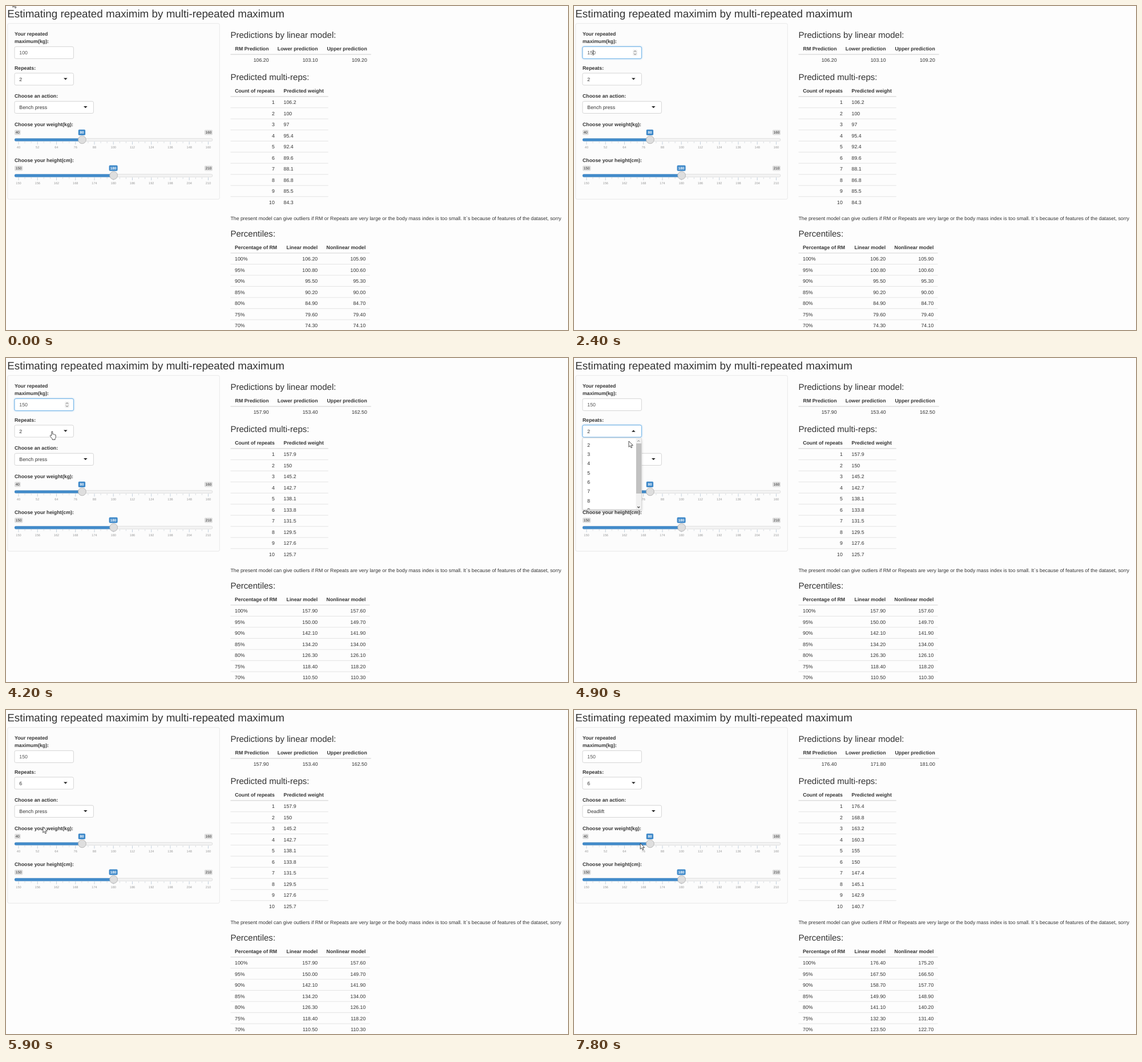
These frames come from a looping animation (985x569 px, 8 s). An HTML page:

```html
<!DOCTYPE html>
<html lang="en">
<head>
<meta charset="utf-8">
<title>Repeated maximum</title>
<style>
html, body { margin: 0; width: 100%; height: 100%; overflow: hidden; background: #fdfdfd; }
svg { display: block; }
text {
  font-family: "Liberation Sans", Arial, sans-serif;
  font-size: 8.79px;
  fill: #333;
  text-rendering: geometricPrecision;
}
.h2 { font-size: 18.84px; }
.h3 { font-size: 15.07px; }
.b { font-weight: bold; }
.e { text-anchor: end; }
.m { text-anchor: middle; }
.tag { font-size: 6.28px; }
.on { fill: #fff; }
.tick { font-size: 5.65px; fill: #999; }
.box { fill: #fff; stroke: #ccc; stroke-width: .8; }
.focus { fill: #fff; stroke: #66afe9; stroke-width: .9; }
.glow { fill: #66afe9; opacity: .6; filter: url(#soft); }
.shade { fill: #000; opacity: .2; filter: url(#wide); }
.rule { stroke: #ddd; stroke-width: .8; }
.head { stroke-width: 1.26; }
.pointer { fill: #fff; stroke: #222; stroke-width: .8; stroke-linejoin: round; }
</style>
</head>
<body>
<svg id="stage" width="985" height="569" viewBox="0 0 985 569">
  <defs>
    <filter id="soft" x="-20%" y="-50%" width="140%" height="200%"><feGaussianBlur stdDeviation="1.5"/></filter>
    <filter id="wide" x="-20%" y="-30%" width="140%" height="160%"><feGaussianBlur stdDeviation="2.2"/></filter>
    <clipPath id="listClip"><rect x="15" y="140" width="103.5" height="126"/></clipPath>
  </defs>
  <g id="page"></g>
  <g id="tables"></g>
  <g id="lists"></g>
  <g id="cursors">
    <path id="arrow" class="pointer" d="M0 0V10.3L2.4 8L4 11.8L5.8 11L4.2 7.4H7.4Z"/>
    <path id="hand" class="pointer" d="M3 8V1.6Q3 .4 4 .4T5 1.6V5.4Q6 4.7 6.8 5.7Q7.8 5.2 8.6 6.3Q10.4 5.9 10.4 7.6V10.4Q10.4 12.3 9.2 13.2V15H4.4V13.6L.8 9.2Q-.2 7.6 1.2 7.2Q2.2 7 3 8Z"/>
    <path id="beam" d="M-1.6 -5H1.6M0 -5V5M-1.6 5H1.6" stroke="#fff" stroke-width="1.1"/>
  </g>
</svg>
<script>
const $ = id => document.getElementById(id);
const text = (x, y, s, cls = '', id = '') => `<text x="${x}" y="${y}" class="${cls}" id="${id}">${s}</text>`;
const rect = (x, y, w, h, cls, more = '') => `<rect x="${x}" y="${y}" width="${w}" height="${h}" class="${cls}" ${more}/>`;
const rule = (x, y, end, cls = '') => `<path class="rule ${cls}" d="M${x} ${y}H${end}"/>`;
const group = (id, body) => `<g id="${id}">${body}</g>`;

// Text field with a focus ring that can be faded in.
const field = (id, y, w) => rect(15, y, w, 21.1, 'box', 'rx="2.5"') +
  group(id + 'Ring', rect(14.5, y - .5, w + 1, 22.1, 'glow', 'rx="3"') + rect(15, y, w, 21.1, 'focus', 'rx="2.5"'));

const select = (id, y, w, value) => field(id, y, w) +
  text(23.3, y + 13.7, value, '', id + 'Text') +
  `<path id="${id}Down" fill="#222" d="M${w - 2.4} ${y + 8.6}h6.6l-3.3 3.3z"/>` +
  `<path id="${id}Up" fill="#222" d="M${w - 2.4} ${y + 11.9}h6.6l-3.3 -3.3z"/>`;

function slider(y, min, step, value, knob, minW, tagW) {
  const fill = (x, w, c) => rect(x, y - 17.4, w, 9, '', `rx="1.8" fill="${c}"`);
  let s = rect(15.3, y - 2.4, 346.6, 4.8, '', 'rx="2.4" fill="#f3f3f3" stroke="#d6d6d6" stroke-width=".7"') +
    rect(15, y - 2.6, knob - 15, 5.2, '', 'rx="2" fill="#428bca"');
  for (let i = 0; i <= 30; i++) {
    const big = i % 3 === 0, x = 22 + i * 11.083;
    s += `<path d="M${x} ${y + 3.3}v${big ? 5 : 2.5}" stroke="${big ? '#a9bccd' : '#c4ccd4'}" stroke-width=".7"/>`;
    if (big) s += text(x, y + 14.9, min + step * i / 3, 'tick m');
  }
  return s + fill(15, minW, '#ddd') + text(15 + minW / 2, y - 10.6, min, 'tag m') +
    fill(347.8, 14.2, '#ddd') + text(354.9, y - 10.6, min + step * 10, 'tag m') +
    rect(knob - .5 - tagW / 2, y - 18, tagW, 10, '', 'rx="1.8" fill="#428bca"') +
    text(knob - .5, y - 10.6, value, 'tag m on b') +
    `<circle cx="${knob}" cy="${y - .2}" r="6.9" fill="#dedede" stroke="#ababab" stroke-width=".8"/>`;
}

const dropdown = (y, w, h, items) =>
  rect(15, y + 3, w, h, 'shade') + rect(15, y, w, h, 'box', 'rx="1.5"') +
  items.map((s, i) => text(23.3, y + 15.4 + i * 16.33, s)).join('');

$('page').innerHTML =
  text(2.3, 20.3, 'Estimating repeated maximim by multi-repeated maximum', 'h2') +
  rect(2.8, 30.7, 371.6, 308.6, '', 'rx="2.5" fill="#fcfcfc" stroke="#e3e3e3" stroke-width=".8"') +
  text(15, 52.4, 'Your repeated', 'b') + text(15, 65, 'maximum(kg):', 'b') +
  field('kg', 71.4, 103.4) + text(23.3, 85.1, '', '', 'kgText') +
  group('spin', rect(103, 76.5, 8, 11, '', 'rx="2" fill="#efefef"') +
    '<path d="M105 80.6l2 -2l2 2M105 83.6l2 2l2 -2" fill="none" stroke="#555" stroke-width=".9"/>') +
  '<path id="caret" d="M0 77v10" stroke="#222" stroke-width=".8"/>' +
  text(15, 111.5, 'Repeats:', 'b') + select('rep', 117.9, 103.4, '2') +
  text(15, 161.2, 'Choose an action:', 'b') + select('act', 167.4, 138.4, 'Bench press') +
  text(15, 211, 'Choose your weight(kg):', 'b') + slider(235, 40, 12, 80, 133.4, 10.6, 12.4) +
  text(15, 273.8, 'Choose your height(cm):', 'b') + slider(297.8, 150, 6, 180, 188.6, 14.4, 15) +
  text(393.4, 56.4, 'Predictions by linear model:', 'h3') +
  text(393.4, 130.4, 'Predicted multi-reps:', 'h3') +
  text(393.4, 376.2, 'The present model can give outliers if RM or Repeats are very large or the body mass index is too small. It`s because of features of the dataset, sorry') +
  text(393.4, 405.4, 'Percentiles:', 'h3');

$('kgText').style.fill = '#555';

$('lists').innerHTML =
  group('repList', dropdown(140.2, 103.4, 126, []) +
    `<g clip-path="url(#listClip)">${[2, 3, 4, 5, 6, 7, 8, 9].map((n, i) => text(23.3, 155.6 + i * 16.33, n)).join('')}</g>` +
    rect(108.5, 140.6, 9.6, 125.2, '', 'fill="#f1f1f1"') + rect(109, 150, 9, 88, '', 'fill="#c1c1c1"') +
    '<path d="M111.2 146.8l2 -2l2 2" fill="none" stroke="#777" stroke-width=".9"/>' +
    '<path d="M111.2 261l2 2l2 -2" fill="none" stroke="#444" stroke-width="1.1"/>') +
  group('actList', dropdown(189.8, 138.4, 55.4, ['Bench press', 'Squat', 'Deadlift']));

const results = [
  { rm: [106.2, 103.1, 109.2], linear: 106.155, curved: 105.88,
    reps: [106.2, 100, 97, 95.4, 92.4, 89.6, 88.1, 86.8, 85.5, 84.3] },
  { rm: [157.9, 153.4, 162.5], linear: 157.9, curved: 157.62,
    reps: [157.9, 150, 145.2, 142.7, 138.1, 133.8, 131.5, 129.5, 127.6, 125.7] },
  { rm: [176.4, 171.8, 181], linear: 176.36, curved: 175.22,
    reps: [176.4, 168.8, 163.2, 160.3, 155, 150, 147.4, 145.1, 142.9, 140.7] }
];

function tables({ rm, linear, curved, reps }) {
  const money = v => v.toFixed(1) + '0';
  const ends = [460.6, 546.6, 632.8];
  let s = rule(393.5, 85, 639.8, 'head') + rule(393.5, 159, 564.8, 'head') + rule(393.5, 433.9, 637.6, 'head');
  ['RM Prediction', 'Lower prediction', 'Upper prediction'].forEach((h, i) => {
    s += text(ends[i], 78.2, h, 'b e') + text(ends[i], 98.2, money(rm[i]), 'e');
  });
  s += text(470.9, 152.2, 'Count of repeats', 'b e') + text(486.6, 152.2, 'Predicted weight', 'b');
  reps.forEach((v, i) => {
    const y = 172.4 + i * 19.5;
    s += text(470.9, y, i + 1, 'e') + text(486.6, y, v);
    if (i) s += rule(393.5, y - 13.2, 564.8);
  });
  s += text(401, 427.2, 'Percentage of RM', 'b') + text(546.2, 427.2, 'Linear model', 'b e') +
    text(630.4, 427.2, 'Nonlinear model', 'b e');
  for (let i = 0; i < 7; i++) {
    const y = 447.2 + i * 19.5, p = 100 - 5 * i;
    s += text(401, y, p + '%') + text(546.2, y, money(linear * p / 100), 'e') +
      text(630.4, y, money(curved * p / 100), 'e');
    if (i) s += rule(393.5, y - 13.3, 637.6);
  }
  return s;
}

// time, shape, x, y
const path = [
  [0, 'arrow', 12, -8], [100, 'arrow', 12, -8], [300, 'arrow', 27, 45], [400, 'beam', 38.6, 82],
  [600, 'beam', 38.6, 82], [900, 'beam', 35.2, 82], [2100, '', 0, 0],
  [3800, 'beam', 38, 85], [3900, 'beam', 45, 93], [4000, 'arrow', 58, 106], [4100, 'hand', 70, 120],
  [4200, 'hand', 76.8, 128.4], [4400, 'hand', 93.6, 129.4], [4500, 'hand', 93.6, 129.4], [4600, 'hand', 95.6, 129.8],
  [4800, 'hand', 95.6, 129.8], [4900, 'arrow', 96, 146], [5400, 'arrow', 72, 215],
  [5600, 'arrow', 71.3, 212.6], [5800, 'arrow', 71, 212], [6300, 'arrow', 40, 178], [6400, '', 0, 0],
  [7000, 'arrow', 30, 176], [7300, 'arrow', 121, 233], [7500, 'arrow', 116.2, 234], [8000, 'arrow', 116.2, 234]
];

const within = (t, ...spans) => spans.some(([a, b]) => t >= a && t < b);
const ramp = (t, a, b) => Math.min(1, Math.max(0, (t - a) / (b - a)));
const show = (id, on) => { $(id).style.opacity = +on; };

function moveCursor(t) {
  const i = path.findLastIndex(k => k[0] <= t);
  const [t0, shape, x0, y0] = path[i], [t1, next, x1, y1] = path[i + 1];
  const f = next ? ramp(t, t0, t1) : 0;
  for (const id of ['arrow', 'hand', 'beam']) show(id, id === shape);
  if (shape) $(shape).setAttribute('transform', `translate(${x0 + (x1 - x0) * f} ${y0 + (y1 - y0) * f})`);
}

let shown = -1;
function showTables(t) {
  const n = t < 3100 ? 0 : t < 6300 ? 1 : 2;
  if (n !== shown) $('tables').innerHTML = tables(results[shown = n]);
  const dim = within(t, [3000, 3100]) ? .3 : t < 6300 ? .7 * ramp(t, 5900, 6200) : 0;
  show('tables', 1 - dim);
}

function render(t) {
  const repOpen = within(t, [4800, 5800]), actOpen = within(t, [6700, 7800]);
  $('kgText').textContent = t < 2200 ? '100' : t < 2400 ? '10' : '150';
  show('kgRing', ramp(t, 1000, 1400) * (1 - ramp(t, 4700, 4900)));
  show('spin', within(t, [400, 4800]));
  show('caret', within(t, [1100, 1600], [2100, 2900], [3400, 3900], [4400, 4800]));
  $('caret').setAttribute('transform', `translate(${within(t, [2200, 2400]) ? 28.4 : 33.5} 0)`);

  $('repText').textContent = t < 5800 ? '2' : '6';
  $('actText').textContent = t < 7800 ? 'Bench press' : 'Deadlift';
  for (const [id, open] of [['rep', repOpen], ['act', actOpen]]) {
    show(id + 'Ring', open);
    show(id + 'List', open);
    show(id + 'Up', open);
    show(id + 'Down', !open);
  }
  showTables(t);
  moveCursor(t);
}

function tick() {
  render(Math.floor(performance.now() % 8000 / 100) * 100);
  requestAnimationFrame(tick);
}
tick();
</script>
</body>
</html>
```
